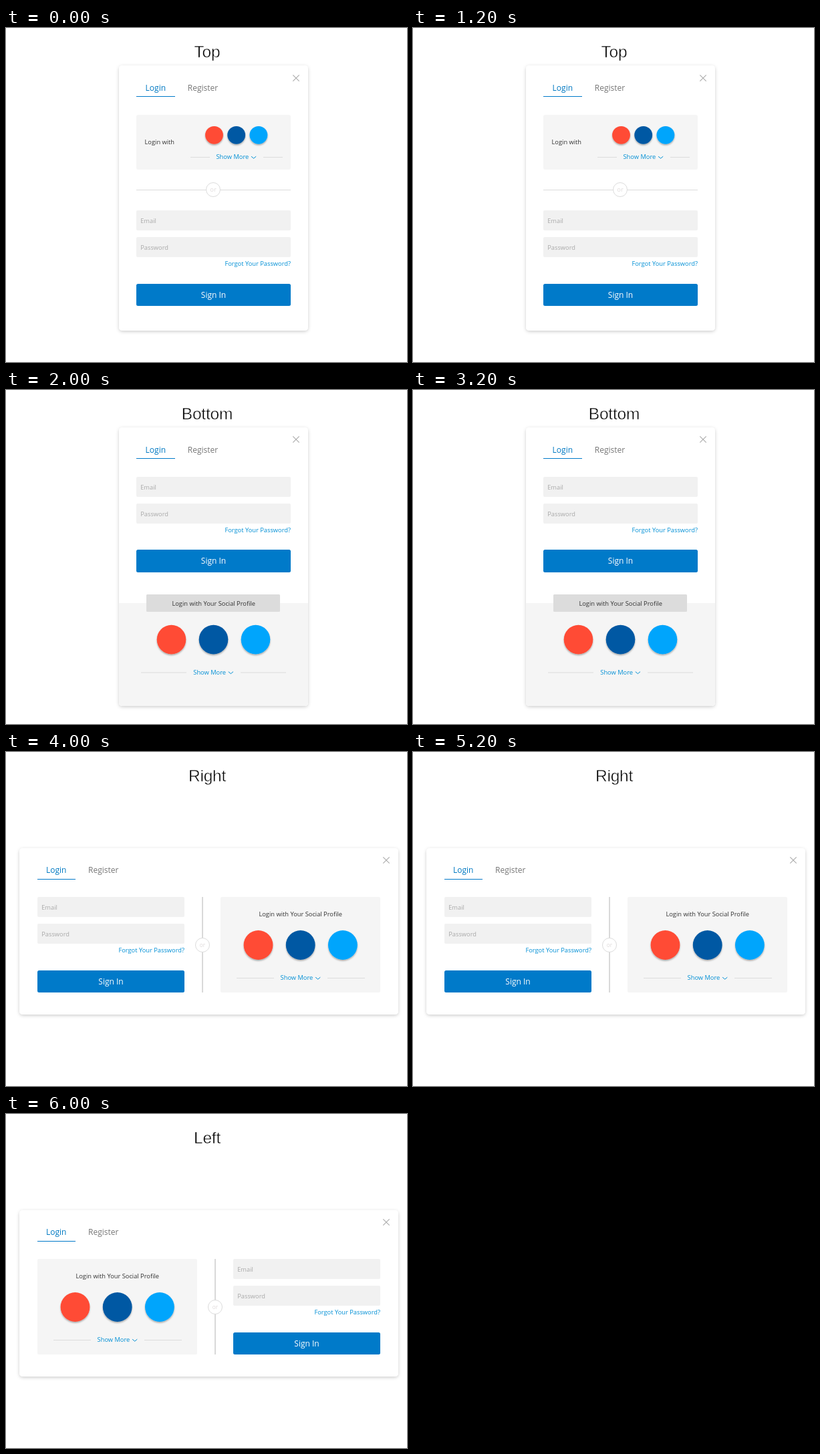
These frames come from a looping animation (600 by 500 pixels, 8 s). An HTML page:

```html
<!DOCTYPE html>
<html lang="en">
<head>
<meta charset="utf-8">
<title>Login form layouts</title>
<style>
html, body { margin: 0; width: 100%; height: 100%; overflow: hidden; background: #fff; }
svg { display: block; width: 600px; height: 500px; }
text { font-family: "Open Sans", sans-serif; font-size: 9.3px; }
.title { font: 24.5px "Liberation Sans", Arial, sans-serif; letter-spacing: -.2px; stroke: #fff; stroke-width: .55px; }
.large { font-size: 12px; }
</style>
</head>
<body>
<svg id="stage" viewBox="0 0 600 500" xmlns="http://www.w3.org/2000/svg">
  <defs>
    <filter id="cardShadow" x="-10%" y="-10%" width="120%" height="120%">
      <feDropShadow dx="0" dy="1.5" stdDeviation="2.5" flood-color="#000" flood-opacity=".2"/>
    </filter>
    <filter id="dotShadow" x="-20%" y="-20%" width="140%" height="150%">
      <feDropShadow dx="0" dy="1.7" stdDeviation="1" flood-color="#000" flood-opacity=".32"/>
    </filter>
  </defs>
</svg>
<script>
const SCENE_MS = 2000;
const BLUE = '#007ac9', LINK = '#008fd5', DARK = '#333', PALE = '#f5f5f5', RULE = '#dcdcdc';
const stage = document.getElementById('stage');

const rect = (x, y, w, h, fill, r = 0, extra = '') =>
  `<rect x="${x}" y="${y}" width="${w}" height="${h}" rx="${r}" fill="${fill}" ${extra}/>`;
const text = (x, y, str, fill, anchor = 'start', cls = '') =>
  `<text x="${x}" y="${y}" fill="${fill}" text-anchor="${anchor}" class="${cls}">${str}</text>`;
const path = (d, stroke, width = 1) =>
  `<path d="${d}" fill="none" stroke="${stroke}" stroke-width="${width}"/>`;

const title = str => text(301, 44.3, str, '#000', 'middle', 'title');

function card(x, y, w, h) {
  return rect(x, y, w, h, '#fff', 5, 'filter="url(#cardShadow)"');
}

function tabs(x, y, width, loginX, registerX, baseline) {
  return text(loginX, baseline, 'Login', '#0079c2', 'start', 'large')
    + text(registerX, baseline, 'Register', '#777', 'start', 'large')
    + rect(x, y, width, 1, BLUE);
}

function closeIcon(x, y) {
  return path(`M${x - 4.7} ${y - 4.7}l9.4 9.4m0 -9.4l-9.4 9.4`, '#adadad', 1.2);
}

function form(x, y, w, buttonY = y + 110, buttonH = 33) {
  const field = (top, label) =>
    rect(x, top, w, 30, '#f1f1f1', 2) + text(x + 6.2, top + 18.6, label, '#a9a9a9');
  return field(y, 'Email') + field(y + 40, 'Password')
    + text(x + w, y + 82.5, 'Forgot Your Password?', LINK, 'end')
    + rect(x, buttonY, w, buttonH, BLUE, 2.5)
    + text(x + w / 2, buttonY + 21, 'Sign In', '#fff', 'middle', 'large');
}

function dots(cx, cy, gap, r) {
  return ['#ff4b36', '#0059a3', '#03a5fc'].map((fill, i) =>
    `<circle cx="${cx + (i - 1) * gap}" cy="${cy}" r="${r}" fill="${fill}" filter="url(#dotShadow)"/>`).join('');
}

// Link with a chevron, flanked by two rules of the given length.
function showMore(x, baseline, leftX, rightX, length) {
  const y = baseline - 4;
  return text(x, baseline, 'Show More', LINK)
    + path(`M${x + 52.5} ${y + 0.2}l3.6 3l3.6 -3`, LINK)
    + rect(leftX, y + 1, length, 1, RULE) + rect(rightX, y + 1, length, 1, RULE);
}

function orBadge(x, y, size) {
  return `<circle cx="${x}" cy="${y}" r="10.5" fill="#fff" stroke="${RULE}"/>`
    + `<text x="${x}" y="${y + 2.8}" fill="#dedada" text-anchor="middle" style="font-size:${size}px">or</text>`;
}

function topScene() {
  return title('Top') + card(169, 56, 283, 397)
    + tabs(195, 102, 58, 208.6, 271.8, 94) + closeIcon(434, 75)
    + rect(195, 130, 231, 82, PALE, 3)
    + text(207.5, 174, 'Login with', DARK)
    + dots(344.7, 160.3, 33.2, 13.4) + showMore(314.5, 196, 276, 385, 29)
    + rect(195, 242, 231, 1, RULE) + orBadge(310, 242, 9.3)
    + form(195, 273, 231);
}

function bottomScene() {
  return title('Bottom') + card(169, 56, 283, 417)
    + tabs(195, 102, 58, 208.6, 271.8, 94) + closeIcon(434, 74)
    + form(195, 130, 231, 239, 34)
    + `<path d="M169 319h283v149a5 5 0 0 1 -5 5h-273a5 5 0 0 1 -5 -5z" fill="${PALE}"/>`
    + rect(210, 306, 200, 26, '#dcdcdc', 1.5)
    + text(310.7, 323, 'Login with Your Social Profile', DARK, 'middle')
    + dots(310.5, 373.6, 63, 21.8) + showMore(280.3, 425.5, 202, 351, 68);
}

function wideScene(name, panelX, dividerX, formX) {
  const mid = panelX + 119.7;
  return title(name) + card(20, 144, 567, 249)
    + tabs(47, 190, 57, 60, 123, 181) + closeIcon(569, 162)
    + rect(panelX, 217, 239, 143, PALE, 2)
    + text(mid, 246, 'Login with Your Social Profile', DARK, 'middle')
    + dots(mid, 289, 63.2, 21.9)
    + showMore(panelX + 89.6, 341, panelX + 24, panelX + 160, 56)
    + rect(dividerX - 1, 217, 2, 143, '#d9d9d9') + orBadge(dividerX, 289, 8.2)
    + form(formX, 217, 220);
}

const scenes = [
  topScene(),
  bottomScene(),
  wideScene('Right', 321, 294, 47),
  wideScene('Left', 47, 313, 340)
].map(markup => {
  const group = document.createElementNS('http://www.w3.org/2000/svg', 'g');
  group.innerHTML = markup;
  stage.appendChild(group);
  return group;
});

function draw(ms) {
  const current = Math.floor(ms / SCENE_MS) % scenes.length;
  scenes.forEach((group, i) => group.setAttribute('display', i === current ? 'inline' : 'none'));
}

const start = performance.now();
function tick() {
  draw(performance.now() - start);
  requestAnimationFrame(tick);
}
tick();
</script>
</body>
</html>
```
